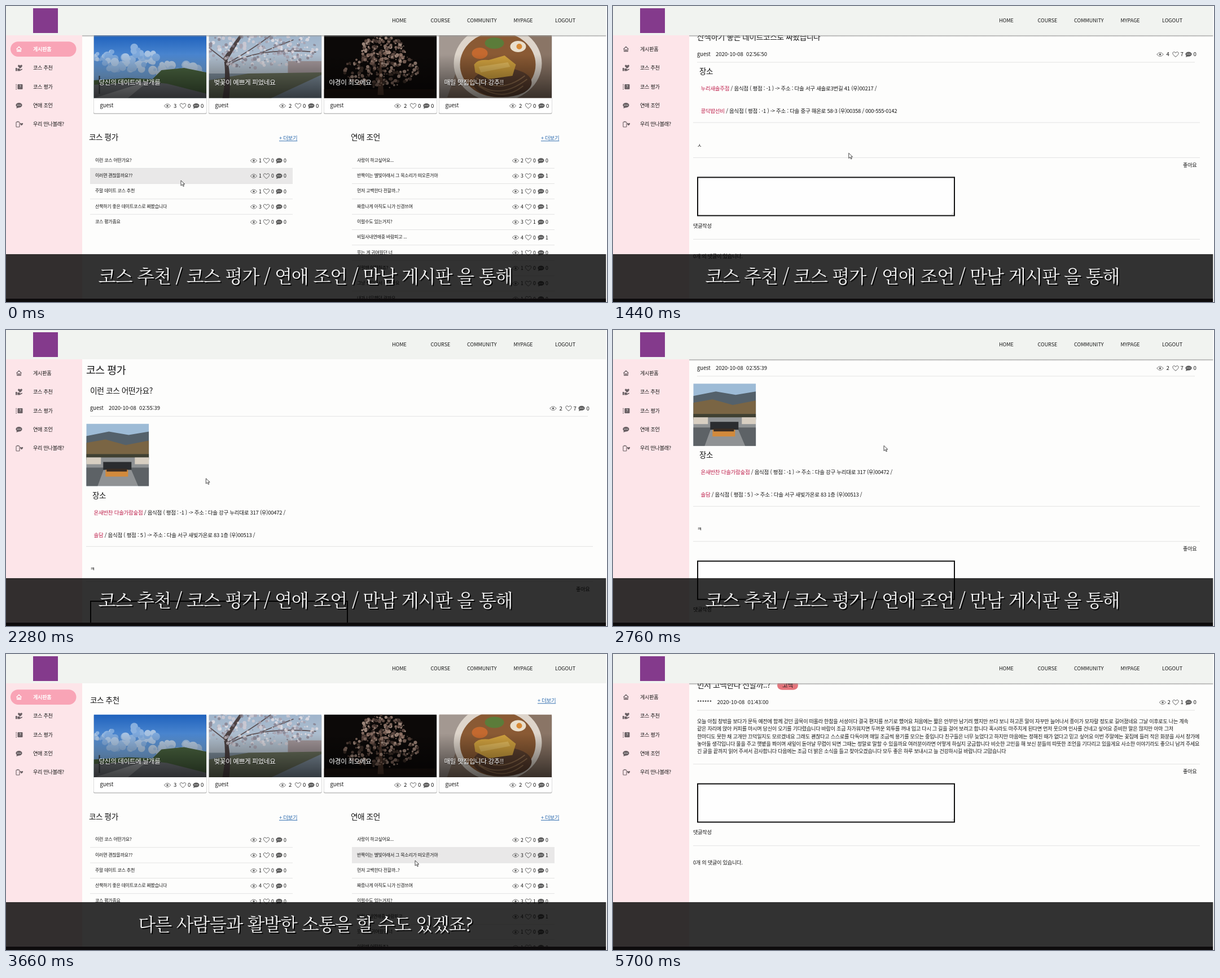
An HTML page that plays this animation: 1065 by 526 pixels, repeating every 5.76 s.

```html
<!DOCTYPE html>
<html lang="ko">
<head>
<meta charset="utf-8">
<title>커뮤니티 게시판</title>
<style>
html, body { margin: 0; width: 100%; height: 100%; overflow: hidden; background: #fff; }
svg { display: block; }
#stage { width: 100%; height: 100%; }
text { font-family: "Noto Sans CJK KR", "Noto Sans CJK", sans-serif; font-weight: 500; letter-spacing: -.03em; white-space: pre; fill: #151515; }
.latin { letter-spacing: 0; }
.more { fill: #2a69ad; text-decoration: underline; }
.white { fill: #fff; }
.caption { font-family: "Noto Serif CJK KR", "Noto Sans CJK KR", "Noto Sans CJK", serif; font-weight: 300; fill: #f5f5f5; letter-spacing: -.038em; text-anchor: middle; }
.shade { fill: #050505; }
</style>
</head>
<body>
<svg id="stage" viewBox="0 0 1065 526" preserveAspectRatio="none">
  <defs>
    <linearGradient id="sky" x2="0" y2="1"><stop stop-color="#1f62bd"/><stop offset=".65" stop-color="#78abe2"/></linearGradient>
    <linearGradient id="dim" x2="0" y2="1"><stop offset=".3" stop-opacity="0"/><stop offset="1" stop-opacity=".6"/></linearGradient>
    <linearGradient id="drop" x2="0" y2="1"><stop stop-color="#858585" stop-opacity=".85"/><stop offset="1" stop-color="#aaa" stop-opacity="0"/></linearGradient>
    <linearGradient id="dusk" x2="0" y2="1"><stop stop-color="#9fb4cb"/><stop offset="1" stop-color="#ccd3d8"/></linearGradient>
  </defs>
  <rect width="1065" height="526" fill="#fdfdfc"/>
  <g id="pages"></g>
  <g id="side"></g>
  <g id="top"></g>
  <g id="pointer"><path d="M0 0V9.2L2.3 7.2L4 10.6L5.5 9.9L3.9 6.6H6.8Z" fill="#fff" stroke="#333" stroke-width=".9" stroke-linejoin="round"/></g>
  <g id="bar"></g>
  <rect x="1063.5" width="1.5" height="526" fill="#fff"/>
</svg>
<script>
const LOOP = 5760;
const $ = id => document.getElementById(id);

// y is the vertical middle of the line of text
const text = (x, y, s, size, cls = '', attrs = '') =>
  `<text x="${x}" y="${(y + size * .36).toFixed(2)}" font-size="${size}" class="${cls}" ${attrs}>${s}</text>`;
const rect = (x, y, w, h, fill, attrs = '') =>
  `<rect x="${x}" y="${y}" width="${w}" height="${h}" fill="${fill}" ${attrs}/>`;
const circle = (x, y, r, fill) => `<circle cx="${x}" cy="${y}" r="${r}" fill="${fill}"/>`;
const ellipse = (x, y, rx, ry, fill) => `<ellipse cx="${x}" cy="${y}" rx="${rx}" ry="${ry}" fill="${fill}"/>`;
const path = (d, fill, attrs = '') => `<path d="${d}" fill="${fill}" ${attrs}/>`;
const at = (x, y, s) => `<g transform="translate(${x} ${y})">${s}</g>`;
const rule = (x1, x2, y) => rect(x1, y - .5, x2 - x1, 1, '#e3e3e3');

function random(seed) {
  return () => (seed = (seed * 16807) % 2147483647) / 2147483647;
}

const HEART = 'M0 4.4C-7 -.2 -5.6 -4.4 -2.9 -4.4Q-1 -4.4 0 -2.4Q1 -4.4 2.9 -4.4C5.6 -4.4 7 -.2 0 4.4Z';
const heart = `<path d="${HEART}" fill="none" stroke="#555" stroke-width=".95"/>`;
const eye = '<path d="M-5.8 0Q0 -7 5.8 0Q0 7 -5.8 0Z" fill="none" stroke="#666" stroke-width=".9"/>' + circle(0, 0, 1.8, '#666');
const bubble = ellipse(0, -.4, 5.6, 4.2, '#5e5e5e') + path('M-4 1L-5 5L0 3Z', '#5e5e5e') +
  [-2.5, 0, 2.5].map(x => circle(x, -.4, .75, '#fff')).join('');

// eye, heart and bubble with their counts; gap is the step from eye to first count
function stats(x, y, [views, likes, notes], size, gap, steps, ids = ['', '']) {
  const num = (dx, n, id) => text(x + dx, y, n, size, 'latin', id ? `id="${id}"` : '');
  const [h, hn, b, bn] = steps;
  return at(x, y, eye) + num(gap, views, ids[0]) + at(x + h, y, heart) + num(hn, likes, ids[1]) +
    at(x + b, y, bubble) + num(bn, notes);
}

// small dots scattered over an ellipse, as for flowers or clouds
function scatter(seed, count, cx, cy, rx, ry, size, colors) {
  const rnd = random(seed);
  let s = '';
  for (let i = 0; i < count; i++) {
    const a = rnd() * 6.283, d = Math.sqrt(rnd());
    s += circle((cx + Math.cos(a) * d * rx).toFixed(1), (cy + Math.sin(a) * d * ry).toFixed(1),
      (size * (.4 + rnd())).toFixed(1), colors[i % colors.length]);
  }
  return `<g opacity=".75">${s}</g>`;
}

const photos = [
  rect(0, 0, 200, 112, 'url(#sky)') +
    scatter(11, 60, 55, 42, 56, 22, 6, ['#a5c3e6', '#c9d9ea', '#8fb4e0']) +
    scatter(23, 40, 150, 62, 50, 13, 6, ['#b7cce4', '#d2dde8']) +
    path('M0 80L60 76L104 78L120 62L160 58L200 66V112H0Z', '#49633f') +
    path('M0 88L90 82L130 86L200 104V112H0Z', '#6f7378') + path('M0 112L88 84L94 84L60 112Z', '#9b9ea1') +
    rect(9, 72, 2, 32, '#3b4140'),
  rect(0, 0, 200, 112, 'url(#dusk)') + rect(140, 46, 60, 24, '#a3979a') + rect(0, 68, 200, 44, '#8292a0') +
    path('M0 112V80L70 68L200 66V70L110 112Z', '#69705c') +
    path('M24 112Q32 70 26 40L54 0H60L33 44Q40 76 36 112Z', '#4d4344') +
    path('M30 56Q80 20 190 30M32 50Q70 30 110 0M28 44L0 22M90 32L150 8', 'none', 'stroke="#5b4f52" stroke-width="1.6"') +
    scatter(41, 300, 80, 22, 115, 36, 2.4, ['#d5ccd3', '#a99fab', '#e9e2e6', '#857c89']),
  rect(0, 0, 200, 112, '#0c0908') + rect(0, 96, 200, 16, '#1c120e') +
    path('M95 106L100 30L106 106Z', '#4b3429') +
    scatter(7, 170, 104, 28, 40, 28, 2.3, ['#a88a7c', '#cdb0a0', '#7b6157', '#54423b']) +
    scatter(19, 240, 102, 62, 66, 32, 2.3, ['#a18173', '#c2a494', '#6b5349', '#49382f']),
  rect(0, 0, 200, 112, '#8a7566') + path('M0 0H52L14 112H0Z', '#a39891') +
    ellipse(104, 50, 78, 68, '#ded5cb') + ellipse(104, 52, 67, 58, '#8a5a34') + ellipse(112, 84, 52, 26, '#5e4130') +
    path('M62 82Q104 118 156 78M66 76Q108 106 152 72M70 90Q112 120 149 90', 'none', 'stroke="#94704f" stroke-width="2"') +
    path('M62 52Q68 42 88 44L116 36L136 52L130 72L88 78L64 66Z', '#cfa03e') + path('M70 56L122 48L126 56L74 66Z', '#dfb75b') +
    ellipse(72, 32, 14, 10, '#c4692f') + ellipse(98, 14, 17, 10, '#5b7c3a') + ellipse(140, 20, 14, 10, '#e9decb') + circle(142, 20, 5, '#d98a34')
];

const more = (x, y) => text(x, y, '+ 더보기', 9.4, 'more');
const ROW = 27.3, ROW_Y = 329.4;

function rows(x, items, key) {
  return items.map(([title, ...n], i) => {
    const y = ROW_Y + i * ROW;
    return (i < items.length - 1 ? rule(x, x + 359, y + 14.4) : '') + text(x + 9, y, title, 8) +
      stats(x + 290, y + 1, n, 8.8, 9, [22.5, 31, 45, 53], [key + i, '']);
  }).join('');
}

const leftItems = [
  ['이런 코스 어떤가요?', 1, 0, 0], ['이러면 괜찮을까요??', 1, 0, 0], ['주말 데이트 코스 추천', 1, 0, 0],
  ['산책하기 좋은 데이트코스로 짜봤습니다', 3, 0, 0], ['코스 평가좀요', 1, 0, 0]
];
const rightItems = [
  ['사랑이 하고싶어요...', 2, 0, 0], ['반짝이는 별빛아래서 그 목소리가 떠오른거야', 3, 0, 1],
  ['먼저 고백한다 전할까..?', 1, 0, 0], ['짜증나게 아직도 니가 신경쓰여', 4, 0, 1],
  ['이럴수도 있는거지?', 3, 1, 0], ['비밀사내연애중 바람피고 ...', 4, 0, 1],
  ['웃는 게 귀여웠던 너', 1, 0, 0], ['이럴땐 어떡하죠?', 1, 0, 0],
  ['그냥 생각나서 적어봐요', 1, 0, 0], ['내가 너무했던 걸까요', 1, 0, 0]
];
const cards = [['당신의 데이트에 날개를', 3], ['벚꽃이 예쁘게 피었네요', 2], ['야경이 최오에요', 2], ['매밀 맛집입니다 강추!!', 2]];

function listPage() {
  const deck = cards.map(([title, views], i) => {
    const x = 155.5 + i * 204;
    return rect(x - .5, 108.5, 200.5, 139, '#bdbdbd', 'rx="2"') + rect(x, 107.5, 199.5, 138.5, '#fff', 'rx="2"') +
      `<svg x="${x}" y="107.5" width="199.5" height="111.5">${photos[i]}${rect(0, 0, 200, 112, 'url(#dim)')}</svg>` +
      text(x + 9.6, 192, title, 11.6, 'shade', 'opacity=".5"') + text(x + 9, 191.3, title, 11.6, 'white') +
      text(x + 11, 232, 'guest', 9.3, 'latin') +
      stats(x + 130.5, 233, [views, 0, 0], 9.6, 11, [27.5, 36, 51, 59]);
  }).join('');
  return text(149, 82, '코스 추천', 13.6) + more(942, 83) + deck +
    text(147, 289, '코스 평가', 13.6) + more(484, 290.5) +
    text(611, 289, '연애 조언', 13.6) + more(948, 290.5) +
    rect(0, 0, 359, 27.3, '#e9e8e8', 'id="hover"') +
    rows(149, leftItems, 'left') + rows(613, rightItems, 'right');
}

const meta = (name, date, dateX, n, eyeX, gap, likeId) =>
  text(149, 138.7, name, 9.3, 'latin') + text(dateX, 138.7, date, 9.5, 'latin') + rule(149, 1031, 153.3) +
  stats(eyeX, 139.3, n, 9.6, gap, [997 - eyeX, 1005.5 - eyeX, 1020 - eyeX, 1028.5 - eyeX], ['', likeId]);

const replyBox = y => rule(142, 1040, y - 34) + text(1010, y - 20.5, '좋아요', 9.2) +
  rect(150, y + 1, 455, 68, '#fefefe', 'stroke="#111" stroke-width="2"') +
  path(`M600 ${y + 67}l4 -4M602.5 ${y + 67}l1.5 -1.5`, 'none', 'stroke="#888" stroke-width=".6"') +
  text(142, y + 87, '댓글작성', 9.2) + rule(142, 1040, y + 111) + text(142, y + 141, '0개 의 댓글이 있습니다.', 9.2);

const place = (y, name, rest) => text(155.5, y, `<tspan fill="#bf1f4b">${name}</tspan> / 음식점 ${rest}`, 9.5);

function coursePage(title, date, views, dy, places, note, picture = '') {
  return text(142, 71.3, '코스 평가', 18.4) + text(149, 108.3, title, 13.75) +
    meta('guest', date, 182, [views, 7, 0], 969.5, 11) + picture +
    text(153, 169.7 + dy, '장소', 13.5) +
    places.map((p, i) => place(199.9 + dy + 40 * i, ...p)).join('') +
    rule(142, 1040, 260.4 + dy) + text(149, 300.8 + dy, note, 9.2) + replyBox(356.8 + dy);
}

const garden = `<svg x="142.3" y="166.5" width="111" height="111">` +
  rect(0, 0, 111, 111, '#9dbbd6') + path('M0 22L40 14L75 20L111 14V62H0Z', '#54616b') +
  path('M0 34L34 28L70 38L111 30V64H0Z', '#7a6544') + rect(0, 54, 111, 10, '#3f4032') +
  rect(0, 60, 111, 51, '#8f9294') + path('M0 78H32L20 111H0ZM78 78H111V111H92Z', '#5d6266') +
  rect(0, 60, 26, 12, '#d8cfc2') + rect(86, 60, 25, 12, '#d8cfc2') + rect(30, 68, 50, 14, '#2a2c2f') +
  rect(34, 82, 40, 12, '#d28a3c') + rect(36, 80, 36, 5, '#3a2c22') + '</svg>';

const story = [
  '오늘 아침 창밖을 보다가 문득 예전에 함께 걷던 골목이 떠올라 한참을 서성이다 결국 편지를 쓰기로 했어요 처음에는 짧은 안부만 남기려 했지만 쓰다 보니 하고픈 말이 자꾸만 늘어나서 종이가 모자랄 정도로 길어졌네요 그날 이후로도 나는 계속',
  '같은 자리에 앉아 커피를 마시며 당신이 오기를 기다렸습니다 바람이 조금 차가워지면 두꺼운 외투를 꺼내 입고 다시 그 길을 걸어 보려고 합니다 혹시라도 마주치게 된다면 먼저 웃으며 인사를 건네고 싶어요 준비한 말은 많지만 아마 그저',
  '한마디도 못한 채 고개만 끄덕일지도 모르겠네요 그래도 괜찮다고 스스로를 다독이며 매일 조금씩 용기를 모으는 중입니다 친구들은 너무 늦었다고 하지만 마음에는 정해진 때가 없다고 믿고 싶어요 이번 주말에는 꽃집에 들러 작은 화분을 사서 창가에',
  '놓아둘 생각입니다 물을 주고 햇볕을 쬐이며 새잎이 돋아날 무렵이 되면 그때는 정말로 말할 수 있을까요 여러분이라면 어떻게 하실지 궁금합니다 비슷한 고민을 해 보신 분들의 따뜻한 조언을 기다리고 있을게요 사소한 이야기라도 좋으니 남겨 주세요',
  '긴 글을 끝까지 읽어 주셔서 감사합니다 다음에는 조금 더 밝은 소식을 들고 찾아오겠습니다 모두 좋은 하루 보내시고 늘 건강하시길 바랍니다 고맙습니다'
];

const advicePage = () => text(142, 71.3, '연애 조언', 18.4) +
  text(149, 108.3, '먼저 고백한다 전할까..?', 13.75) +
  rect(291, 100.5, 37, 16.5, '#e5757c', 'rx="8.2"') + text(300, 108.5, '고백', 10.6) +
  meta('******', '2020-10-08  01:43:00', 184.5, [2, 0, 0], 974, 8.5, 'likes') +
  story.map((s, i) => text(149, 173 + 13.3 * i, s, 9.1)).join('') + replyBox(283);

const pages = {
  list: listPage(),
  walk: coursePage('산책하기 좋은 데이트코스로 짜봤습니다', '2020-10-08  02:56:50', 4, 0, [
    ['누리새솔주점', '( 평점 : -1 ) -&gt; 주소 : 다솔 서구 새솔로3번길 41 (우)00217 /'],
    ['콩닥밥선비', '( 평점 : -1 ) -&gt; 주소 : 다솔 중구 해온로 58-3 (우)00358 / 000-555-0142']], 'ㅅ'),
  visit: coursePage('이런 코스 어떤가요?', '2020-10-08  02:55:39', 2, 124.2, [
    ['온새반찬 다솔가람숲점', '( 평점 : -1 ) -&gt; 주소 : 다솔 강구 누리대로 317 (우)00472 /'],
    ['솔담', '( 평점 : 5 ) -&gt; 주소 : 다솔 서구 새빛가온로 83 1층 (우)00513 /']], 'ㅋ', garden),
  advice: advicePage()
};
$('pages').innerHTML = Object.entries(pages).map(([id, s]) => `<g id="${id}">${s}</g>`).join('');

const INK = '#6a6064';
const menuIcons = [
  path('M-4.5 0L0 -4.3L4.5 0M-3.2 -1V4H3.2V-1M-1 4V1.2H1V4', 'none', 'stroke="currentColor" stroke-width="1.3"'),
  rect(-6, 0, 2.6, 5.5, INK) + path('M-2.6 1H1L2 3L5.6 1.4L6 3L1 5.5H-2.6Z', INK) +
    `<g transform="translate(2 -2.2) scale(.75)">${path(HEART, INK)}</g>`,
  rect(-2.5, -4.5, 9, 9, INK, 'rx="1"') + text(.3, 0, '?', 7.5, 'white latin', 'font-weight="700"') +
    [-4, -1.3, 1.4, 4.1].map(y => rect(-5.6, y - .5, 1.5, 1.4, INK)).join(''),
  path('M-5.6 -.6A5.6 4.2 0 1 1 0 3.6L-4.6 5L-4 2.2Q-5.6 1 -5.6 -.6Z', INK) + [-2.5, 0, 2.5].map(x => circle(x, -.6, .75, '#fff')).join(''),
  rect(-5, -4.2, 6, 9, 'none', `rx="1" stroke="${INK}" stroke-width="1.1"`) + rect(-3.4, -5.3, 2.8, 1.2, INK) +
    `<g transform="translate(4.6 0) scale(.5)">${path(HEART, INK)}</g>`
];
const menu = ['게시판홈', '코스 추천', '코스 평가', '연애 조언', '우리 만나볼래?'];
$('side').innerHTML = rect(0, 52, 135, 474, '#fde5e9') + rect(8, 63.2, 116.5, 26.8, '#f9a4b6', 'rx="13.4" id="pill"') +
  menu.map((s, i) => {
    const y = 76.6 + 33.4 * i;
    return `<g ${i ? '' : 'id="home"'}>${at(23, y, menuIcons[i])}${text(48, y, s, 9.1)}</g>`;
  }).join('');

const nav = [[684, 'HOME'], [752.5, 'COURSE'], [817, 'COMMUNITY'], [899.5, 'MYPAGE'], [973, 'LOGOUT']];
$('top').innerHTML = rect(135, 51.5, 928.5, 4, 'url(#drop)', 'id="shadow"') + rect(0, 0, 1063.5, 52, '#f1f3f0') +
  rect(48, 4, 44, 44, '#843a8c') + nav.map(([x, s]) => text(x, 25.5, s, 9, 'latin')).join('');

const captions = [['코스 추천 / 코스 평가 / 연애 조언 / 만남 게시판 을 통해', 32.2], ['다른 사람들과 활발한 소통을 할 수도 있겠죠?', 31.6]];
$('bar').innerHTML = rect(0, 441, 1063.5, 78.5, '#000', 'opacity=".8"') + rect(0, 519.3, 1063.5, 7, '#0d0b0c') +
  captions.map(([s, size], i) => `<g id="cap${i}">` + text(532.5, 482.5, s, size, 'caption', 'style="fill:#050505"') +
    text(530.5, 480.7, s, size, 'caption') + '</g>').join('');

// [time, page]
const visits = [[0, 'list'], [420, 'walk'], [1500, 'list'], [2100, 'visit'], [3300, 'list'], [4200, 'advice']];
// [time, scroll]
const scrolls = [[0, 55.5], [419, 55.5], [420, 0], [660, 0], [720, 6.7], [860, 53.3], [2099, 53.3], [2100, 0],
  [2460, 0], [2700, 71.3], [3299, 71.3], [3300, 0], [5300, 0], [5520, 53.3]];
// [time, x, y]
const moves = [[0, 310, 310], [240, 330, 352], [420, 340, 355], [720, 469.5, 248], [1200, 469.5, 248],
  [1560, 400, 266], [1800, 330.5, 275], [2100, 326, 277], [2760, 480, 205.5], [3120, 480, 205.5],
  [3660, 725, 367], [3900, 715, 382], [4200, 700, 384], [4800, 432, 264.5], [5100, 1020, 263],
  [5260, 1020, 263], [5420, 1070, 300]];
const LIKED = 5180;

function sample(keys, t) {
  const n = keys.findIndex(k => k[0] > t);
  if (n < 0) return keys[keys.length - 1].slice(1);
  const a = keys[n - 1], b = keys[n], p = (t - a[0]) / (b[0] - a[0]), e = p * p * (3 - 2 * p);
  return a.slice(1).map((v, i) => v + (b[i + 1] - v) * e);
}

function placeHover(x, y, scroll) {
  const row = Math.floor((y + scroll - ROW_Y + 13) / ROW);
  const left = x > 149 && x < 508, right = x > 613 && x < 972;
  const on = row >= 0 && (left && row < leftItems.length || right && row < rightItems.length);
  $('hover').style.display = on ? '' : 'none';
  $('hover').setAttribute('x', left ? 149 : 613);
  $('hover').setAttribute('y', ROW_Y - 12.9 + row * ROW);
}

function draw(t) {
  const page = visits.filter(v => v[0] <= t).pop()[1];
  const [scroll] = sample(scrolls, t), [x, y] = sample(moves, t);
  for (const id in pages) $(id).style.display = id === page ? '' : 'none';
  $(page).setAttribute('transform', `translate(0 ${-scroll})`);

  const home = page === 'list';
  $('pill').style.display = home ? '' : 'none';
  $('home').style.color = home ? '#fff' : INK;
  $('home').lastChild.style.cssText = home ? 'fill:#fff;font-weight:700' : '';
  $('shadow').style.display = scroll > 1 ? '' : 'none';
  $('left3').textContent = t < 420 ? 3 : 4;
  $('left0').textContent = t < 2100 ? 1 : 2;
  $('likes').textContent = t < LIKED ? 0 : 1;

  if (home) placeHover(x, y, scroll);
  $('pointer').setAttribute('transform', `translate(${x} ${y})`);
  $('cap0').setAttribute('opacity', sample([[0, 1], [3000, 1], [3140, 0]], t)[0]);
  $('cap1').setAttribute('opacity', sample([[0, 0], [3160, 0], [3300, 1], [5460, 1], [5640, 0]], t)[0]);
}

const start = performance.now();
function tick() {
  draw((performance.now() - start) % LOOP);
  requestAnimationFrame(tick);
}
tick();
</script>
</body>
</html>
```
